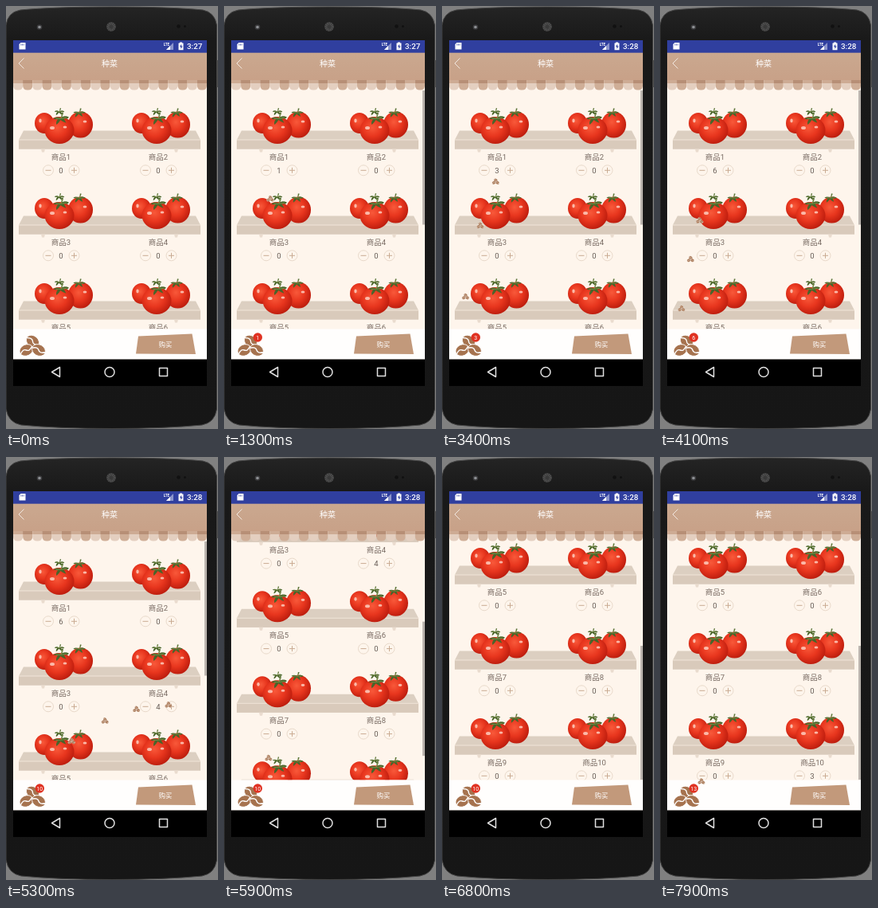
An HTML page that plays this animation: 266 px wide and 531 px high, repeating every 8 s.

```html
<!DOCTYPE html>
<html lang="zh">
<head>
<meta charset="utf-8">
<title>种菜</title>
<style>
html, body { margin: 0; width: 100%; height: 100%; overflow: hidden; background: #808080; }
svg { display: block; width: 100%; height: 100%; }
text { font-family: Roboto, "Noto Sans CJK SC", "Noto Sans CJK", sans-serif; text-anchor: middle; }
</style>
</head>
<body>
<svg viewBox="0 0 266 531">
  <defs>
    <linearGradient id="body" x2="0" y2="1">
      <stop offset="0" stop-color="#242424"/><stop offset=".08" stop-color="#191919"/><stop offset="1" stop-color="#161616"/>
    </linearGradient>
    <linearGradient id="bar" x2="0" y2="1">
      <stop offset="0" stop-color="#caa88f"/><stop offset="1" stop-color="#c8a188"/>
    </linearGradient>
    <radialGradient id="red" cx=".42" cy=".4" r=".65">
      <stop offset="0" stop-color="#f8593a"/><stop offset=".5" stop-color="#e8361e"/><stop offset="1" stop-color="#b81a0c"/>
    </radialGradient>
    <clipPath id="list"><rect x="9" y="97" width="243" height="308.5"/></clipPath>
    <g id="leaf">
      <path d="M0 2Q-5 -1 -9 2Q-6 3 -4 3Q-7 6 -6 9Q-3 7 -1 4Q2 7 5 8Q4 5 3 3Q7 4 9 2Q5 -1 1 1Q3 -2 3 -4L1 -4Q1 -1 0 2Z" fill="#48652a"/>
      <path d="M-6 2L0 2.5L6 2.3M0 2L2 -3" stroke="#86994f" stroke-width=".7" fill="none"/>
    </g>
    <g id="tomatoes">
      <ellipse cx="48" cy="147" rx="12" ry="13" fill="url(#red)"/>
      <ellipse cx="93.5" cy="149" rx="15.500" ry="16.500" fill="url(#red)"/>
      <use href="#leaf" transform="translate(92 132) scale(.85)"/>
      <ellipse cx="67" cy="156" rx="18.500" ry="17" fill="url(#red)"/>
      <use href="#leaf" transform="translate(67 131) scale(.7)"/>
      <use href="#leaf" transform="translate(69 138.5) rotate(-6) scale(1.1)"/>
      <g fill="#ffd6c8" opacity=".8">
        <ellipse cx="58" cy="153" rx="3" ry="2"/><ellipse cx="74" cy="152" rx="2.400" ry="1.500"/>
        <ellipse cx="99" cy="145" rx="2.400" ry="1.600"/><ellipse cx="43" cy="144" rx="1.700" ry="2.400"/>
      </g>
    </g>
    <g id="shelf">
      <path d="M22 156.5H238L244 168V179.5H16V168Z" fill="#dccfc1"/>
      <path d="M16 168H244V179.5H16Z" fill="#d9cabb"/>
      <path d="M16 168H244" stroke="#f3e8dc" stroke-width=".9"/>
      <path d="M44 179.5h5l-1 4h-3zM211 179.5h5l-1 4h-3z" fill="#eadccf"/>
    </g>
    <g id="bean">
      <ellipse rx="8.800" ry="7" fill="#a6734f" stroke="#fff" stroke-width=".8"/>
      <path d="M-8.600 1.500Q-3 -3.500 0 0T8.600 -1.500" fill="none" stroke="#fff" stroke-width="1.400"/>
    </g>
    <g id="beans">
      <use href="#bean" transform="translate(.5 -6) rotate(40)"/>
      <use href="#bean" transform="translate(-7.5 5) rotate(-25)"/>
      <use href="#bean" transform="translate(8 5) rotate(28)"/>
    </g>
  </defs>

  <path d="M0 24Q2 8 18 5Q60 1 133 1T247 5Q262 8 264.500 24V506Q262 523 246 526Q200 530.500 133 530.500T19 526Q3 523 0 506Z" fill="url(#body)" stroke="#444"/>
  <rect x="264" y="68" width="2" height="34" fill="#4a4a4a"/>
  <circle cx="42" cy="26.500" r="3.300" fill="#3b3b3d"/><circle cx="42" cy="26.500" r="1.800" fill="#8e9094"/>
  <circle cx="132" cy="26" r="6" fill="#3a3a3a"/>
  <circle cx="132" cy="26" r="4" fill="none" stroke="#555" stroke-width="3" stroke-dasharray="1 1"/>
  <circle cx="216.500" cy="25.500" r="2.300" fill="#111"/><circle cx="224.500" cy="25.500" r="1.500" fill="#111"/>

  <rect x="9" y="43" width="243" height="434" fill="#fef5ec"/>
  <g clip-path="url(#list)">
    <g id="rows"></g>
    <rect id="thumb" x="249" width="3" height="168.500" fill="#b9b3ad"/>
  </g>

  <rect x="9" y="43" width="243" height="16" fill="#303f9f"/>
  <path d="M18.500 46H24.500V54.500H16.500V48Z" fill="#fff"/>
  <path d="M18.800 47.500v2M20.500 47.500v2M22.200 47.500v2" stroke="#303f9f" stroke-width=".7"/>
  <text x="201.500" y="50" font-size="4.500" font-weight="700" fill="#fff">LTE</text>
  <path d="M210 46V55H201Z" fill="#8c95cc"/><path d="M206 50V55H201Z" fill="#fff"/>
  <path d="M216.500 46.500h1.500v-1h3v1h1.500v8.800h-6z" fill="#fff"/>
  <path d="M220.200 47.800l-2.300 3.500h1.500v2.700l2.200-3.600h-1.400z" fill="#303f9f"/>
  <text id="clock" x="246.300" y="54.400" font-size="9.800" font-weight="500" fill="#fff" style="text-anchor:end"></text>

  <rect x="9" y="58.700" width="243" height="34.500" fill="url(#bar)"/>
  <path d="M22.500 65.500L16 72L22.500 78.500" fill="none" stroke="#f7efe9" stroke-width=".9"/>
  <text x="130" y="76" font-size="10" fill="#fff">种菜</text>
  <g id="awning"></g>

  <rect x="9" y="405.500" width="243" height="38" fill="#fffefd"/>
  <use href="#beans" x="33" y="427"/>
  <g id="badge">
    <circle cx="42.300" cy="416" r="5.700" fill="#e03222"/>
    <text id="total" x="42.300" y="418.600" font-size="7" fill="#fff"></text>
  </g>
  <path d="M166 414.500L233.500 411.500L238 437L163 436.500Z" fill="#c2997b"/>
  <text x="200" y="427.500" font-size="8.300" fill="#fff">购买</text>

  <rect x="9" y="443.500" width="243" height="33.500" fill="#000"/>
  <g fill="none" stroke="#e0e0e0" stroke-width="1.500" stroke-linejoin="round">
    <path d="M67.500 453.500V465.500L57.500 459.500Z"/>
    <circle cx="130" cy="459.500" r="6"/>
    <rect x="192.500" y="454.500" width="10" height="10"/>
  </g>
  <g id="flights"></g>
</svg>
<script>
const LOOP = 8000, FLIGHT = 750, PITCH = 107, MAX_SCROLL = 234, COLUMN = 122;
const END = { x: 22, y: 411 };
const TAPS = [
  [0, 980], [0, 2740], [0, 2960], [0, 3190], [0, 3410], [0, 3545], [0, 3680],
  [3, 4795], [3, 4965], [3, 5125], [3, 5288],
  [9, 6870], [9, 7075], [9, 7272]
].map(([item, at]) => ({ item, at }));
const REMOVED_AT = 2100;

const $ = id => document.getElementById(id);
const clamp = v => Math.max(0, Math.min(1, v));
const range = (n, f) => Array.from({ length: n }, (_, i) => f(i)).join('');

function itemMarkup(i) {
  const x = i % 2 * COLUMN;
  return `<g transform="translate(${x} 0)">
    <use href="#tomatoes"/>
    <text x="69" y="193.200" font-size="9.500" fill="#776a62">商品${i + 1}</text>
    <g fill="none" stroke="#e6d6c7" stroke-width=".9"><circle cx="53" cy="206.300" r="6.500"/><circle cx="85.500" cy="206.300" r="6.500"/></g>
    <path d="M49.500 206.300h7M82 206.300h7M85.500 202.800v7" stroke="#c9ab92"/>
    <text class="count" x="69" y="210" font-size="9.500" fill="#665c56"></text>
  </g>`;
}

$('rows').innerHTML = range(5, r =>
  `<g transform="translate(0 ${r * PITCH})"><use href="#shelf"/>${itemMarkup(r * 2)}${itemMarkup(r * 2 + 1)}</g>`);

const SCALLOP = 243 / 20;
$('awning').innerHTML = range(20, i => {
  const x = 9 + i * SCALLOP, odd = i % 2;
  return `<path d="M${x} 93h${SCALLOP}v7q0 5.500 -${SCALLOP / 2} 5.500t-${SCALLOP / 2} -5.500z" fill="${odd ? '#cfae97' : '#e4cfc0'}"/>
    <path d="M${x} 93h${SCALLOP}v4h-${SCALLOP}z" fill="${odd ? '#b78f76' : '#cdab94'}"/>`;
});

$('flights').innerHTML = TAPS.map(() => '<use href="#beans"/>').join('');
const flights = [...$('flights').children];
const counts = [...document.querySelectorAll('.count')];

const scrollAt = t => MAX_SCROLL * (1 - (1 - clamp((t - 5667) / 607)) ** 3);

// Steady in x, accelerating in y: a quadratic curve with a level start.
function moveFlight(node, { item, at }, t) {
  const p = (t - at) / FLIGHT, flying = p >= 0 && p < 1;
  node.style.display = flying ? '' : 'none';
  if (!flying) return;
  const x0 = 85 + item % 2 * COLUMN;
  const y0 = 204 + Math.floor(item / 2) * PITCH - scrollAt(at);
  const x = x0 + (END.x - x0) * p, y = y0 + (END.y - y0) * p * p;
  node.setAttribute('transform', `translate(${x} ${y}) scale(.28)`);
}

function render(t) {
  const scroll = scrollAt(t), amounts = counts.map(() => 0);
  for (const tap of TAPS) if (t >= tap.at) amounts[tap.item]++;
  if (t >= REMOVED_AT) amounts[0]--;
  const total = amounts.reduce((a, b) => a + b);

  counts.forEach((node, i) => node.textContent = amounts[i]);
  $('total').textContent = total;
  $('badge').style.display = total ? '' : 'none';
  $('clock').textContent = t < 2600 ? '3:27' : '3:28';
  $('rows').setAttribute('transform', `translate(0 ${-scroll})`);
  $('thumb').setAttribute('y', 106 + scroll * .56);
  $('thumb').style.display = t < 1000 ? 'none' : '';
  flights.forEach((node, i) => moveFlight(node, TAPS[i], t));
}

function frame() {
  render(performance.now() % LOOP);
  requestAnimationFrame(frame);
}
frame();
</script>
</body>
</html>
```
